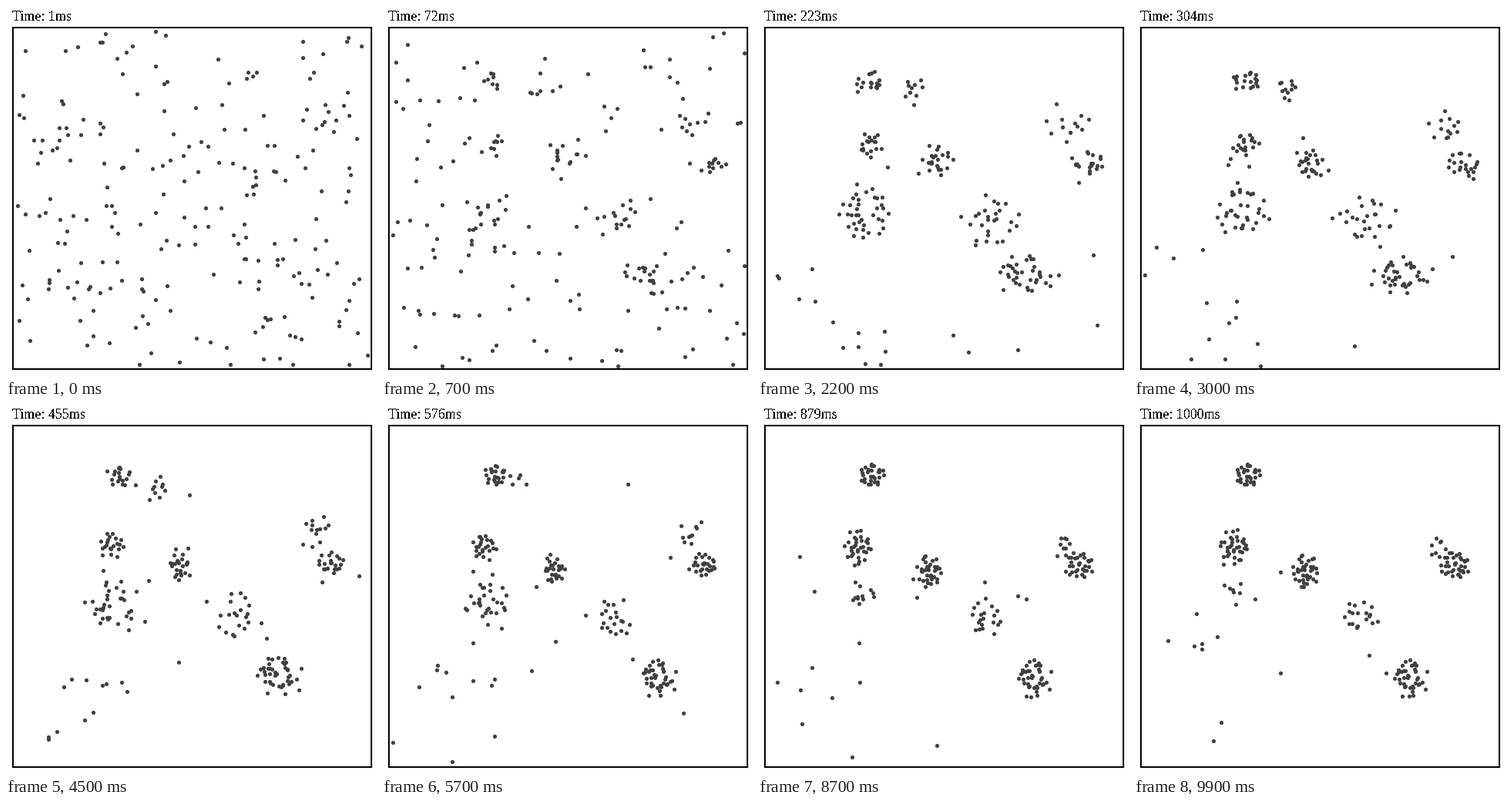
Recreate the animation shown at these times as a matplotlib script. Size 480x480 px, loop 10000 ms.

```python
import numpy as np
import matplotlib.pyplot as plt
from matplotlib.animation import FuncAnimation
from matplotlib.patches import Rectangle

SIZE, DPI = 480, 100
FRAMES, INTERVAL = 100, 100
DOTS, SLOTS = 224, 45
LOW, HIGH = np.array([13, 32]), np.array([469, 466])
GATHERED, SETTLED = 14, 57
COUNT_KEYS = (0, 8, 30, 45, 57, 76, 99)

# start (x, y, rx, ry), end (x, y, rx, ry), settles, members at COUNT_KEYS[1:]
SITES = [
    ((144, 99, 23, 16), (146, 91, 16, 16), True, (17, 20, 17, 28, 28, 28)),
    ((197, 109, 12, 17), (194, 104, 12, 14), True, (12, 11, 9, 0, 0, 0)),
    ((150, 177, 24, 25), (129, 184, 18, 22), True, (18, 20, 21, 25, 30, 36)),
    ((230, 194, 27, 34), (221, 215, 17, 23), True, (24, 27, 24, 28, 33, 39)),
    ((138, 268, 39, 38), (130, 240, 25, 26), False, (37, 34, 31, 30, 14, 7)),
    ((303, 277, 35, 35), (292, 276, 22, 21), False, (28, 25, 18, 22, 21, 19)),
    ((342, 345, 48, 24), (356, 354, 22, 24), True, (34, 38, 42, 38, 41, 42)),
    ((404, 153, 24, 17), (394, 188, 12, 18), False, (13, 14, 13, 9, 9, 8)),
    ((430, 202, 30, 19), (416, 208, 20, 18), True, (20, 22, 22, 28, 33, 35)),
]


def unit_slots(rng, index, capacity):
    """Jittered sunflower layout, filled from the core outwards."""
    slot = np.arange(SLOTS)
    radius = np.sqrt((slot + 0.5) / capacity)
    angle = 2.4 * slot + index
    ring = np.column_stack([radius * np.cos(angle), radius * np.sin(angle)])
    return ring + rng.normal(0, 0.11, ring.shape)


def site_shape(site, t):
    start, end, settles, _ = site
    u = np.clip((t - GATHERED) / ((SETTLED if settles else FRAMES - 1) - GATHERED), 0, 1)
    shape = np.array(start) * (1 - u) + np.array(end) * u
    heat = 3 * (1 - u) if settles else 3
    return shape[:2], shape[2:], heat


def simulate():
    rng = np.random.default_rng(11)
    layouts = [unit_slots(rng, k, max(s[3])) for k, s in enumerate(SITES)]
    members = [[] for _ in SITES]
    pos = rng.uniform(LOW, HIGH, (DOTS, 2))
    heading = rng.uniform(0, 2 * np.pi, DOTS)
    free = set(range(DOTS))
    path = [pos.copy()]

    for t in range(1, FRAMES):
        wanted = [round(np.interp(t, COUNT_KEYS, (0,) + s[3])) for s in SITES]
        for group, n in zip(members, wanted):
            while len(group) > n:
                free.add(group.pop())
        for site, group, n in zip(SITES, members, wanted):
            center = site_shape(site, t)[0]
            while len(group) < n and free:
                near = min(sorted(free), key=lambda d: np.hypot(*(pos[d] - center)))
                free.remove(near)
                group.append(near)

        for site, group, layout in zip(SITES, members, layouts):
            if not group:
                continue
            center, radii, heat = site_shape(site, t)
            pull = 0.28 * (center + radii * layout[:len(group)] - pos[group])
            length = np.hypot(pull[:, 0], pull[:, 1])[:, None]
            pull *= np.minimum(1, 12 / np.maximum(length, 1e-6))
            pos[group] += pull + rng.normal(0, 1, pull.shape) * heat

        strays = sorted(free)
        heading[strays] += rng.normal(0, 0.6, len(strays))
        a = heading[strays]
        pos[strays] += 7 * np.column_stack([np.cos(a), np.sin(a)])
        out_x = (pos[:, 0] < LOW[0]) | (pos[:, 0] > HIGH[0])
        out_y = (pos[:, 1] < LOW[1]) | (pos[:, 1] > HIGH[1])
        heading[out_x] = np.pi - heading[out_x]
        heading[out_y] *= -1
        pos = np.clip(pos, LOW, HIGH)
        path.append(pos.copy())
    return np.round(path) + 0.5


def px(n):
    return n * 72 / DPI


path = simulate()

fig = plt.figure(figsize=(SIZE / DPI, SIZE / DPI), dpi=DPI, facecolor="white")
ax = fig.add_axes([0, 0, 1, 1])
ax.set_xlim(0, SIZE)
ax.set_ylim(SIZE, 0)
ax.axis("off")

ax.add_patch(Rectangle((9, 28), 465, 443, fill=False, ec="black", lw=px(2),
                       joinstyle="miter"))
dots = ax.scatter(path[0][:, 0], path[0][:, 1], s=px(5.2) ** 2, c="#404040",
                  linewidths=0, antialiaseds=False)
label = ax.text(8, 19, "", family="Liberation Serif", size=px(18),
                color="black", va="baseline", antialiased=False)


def draw(i):
    dots.set_offsets(path[i])
    label.set_text(f"Time: {round(1 + i * 999 / (FRAMES - 1))}ms")
    return dots, label


anim = FuncAnimation(fig, draw, frames=FRAMES, interval=INTERVAL,
                     repeat=True, repeat_delay=0)
plt.show()
```
